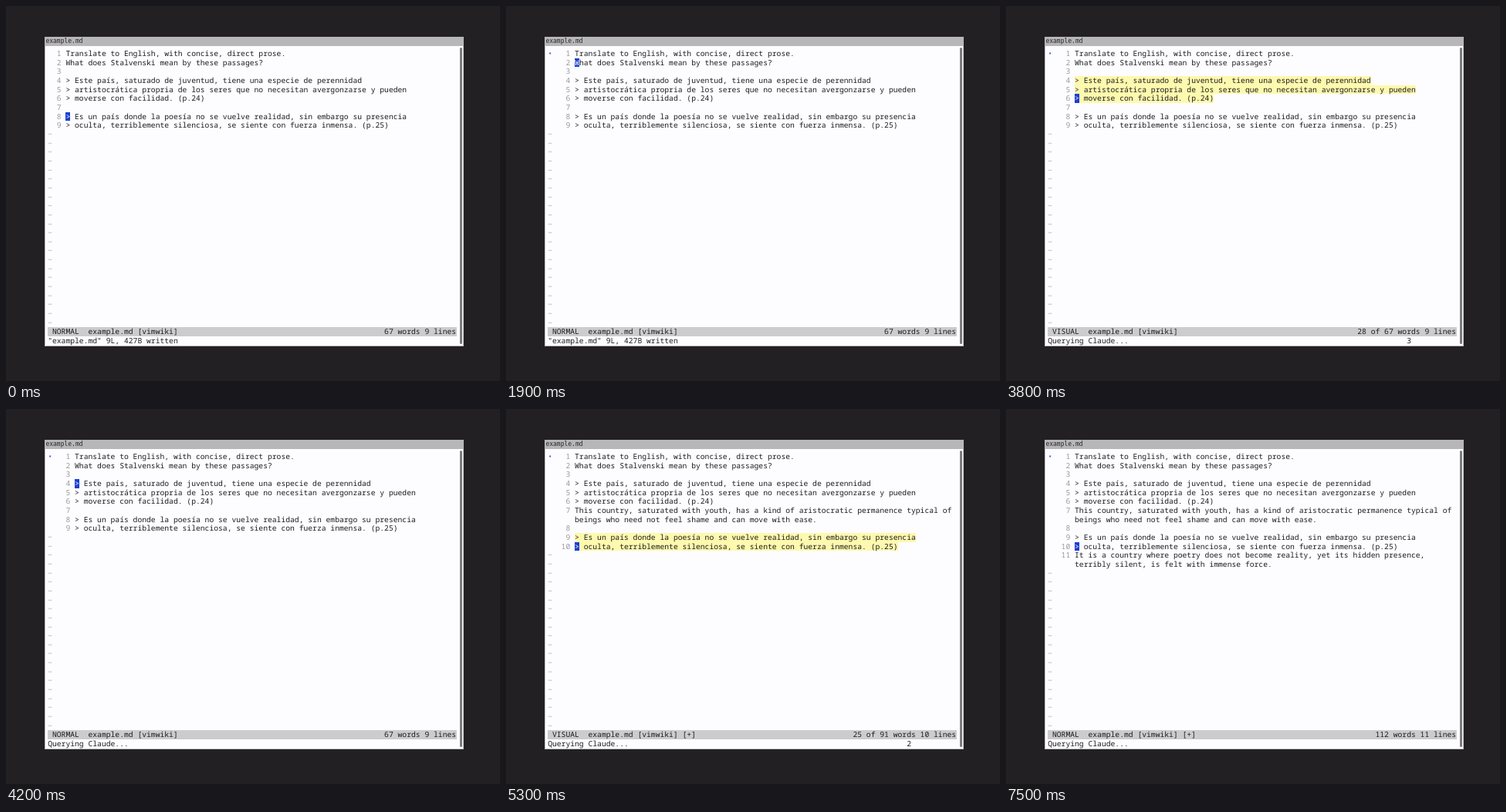
Recreate the animation shown at these times as an HTML page. Size 640x487 px, loop 8000 ms.

```html
<!DOCTYPE html>
<html lang="en">
<head>
<meta charset="utf-8">
<title>example.md</title>
<style>
  html, body { margin: 0; width: 100%; height: 100%; overflow: hidden; background: #222023; }
  #stage { position: relative; width: 640px; height: 487px; overflow: hidden; }
  #stage div { position: absolute; }
  #window { left: 50px; top: 40px; width: 543px; height: 401.5px; background: #fdfcfe; box-shadow: inset 0 0 0 1px #b9b8ba; }
  #title { left: 0; top: 0; width: 543px; height: 12px; background: #b7b6b8;
    font: 8px/12px "DejaVu Sans Mono", monospace; color: #29282a; text-indent: 1.4px; }
  #scroll { left: 538px; top: 13.5px; width: 3.3px; height: 385px; border-radius: 1.5px; background: #7b7a7c; }
  #screen { left: 54.2px; top: 56.2px; width: 530px; height: 385px; text-rendering: geometricPrecision;
    font: 9.7px/11.65px "Noto Sans Mono", "DejaVu Sans Mono", monospace; color: #1d1c1f; }
  .row { left: 0; height: 11.65px; white-space: pre; }
  .row span { display: inline-block; height: 11.65px; line-height: 11.65px; vertical-align: top; white-space: pre; }
  .status { width: 529.7px; background: #cccbcd; }
  .num { color: #9b9a9c; }
  .tilde { color: #a9a8aa; }
  .sign { color: #4a62dc; }
  .sel { background: #fdf9ae; }
  .row .cur { background: #1b3fd2; color: #fff; }
</style>
</head>
<body>
<div id="stage">
  <div id="window">
    <div id="title">example.md</div>
    <div id="scroll"></div>
  </div>
  <div id="screen"></div>
</div>
<script>
const LOOP = 8000, ROW = 11.65, COLS = 91, TEXT_ROWS = 31, SHOWCMD_COL = 80;

const note = [
  "Translate to English, with concise, direct prose.",
  "What does Stalvenski mean by these passages?",
  "",
  "> Este país, saturado de juventud, tiene una especie de perennidad",
  "> artistocrática propria de los seres que no necesitan avergonzarse y pueden",
  "> moverse con facilidad. (p.24)",
  "",
  "> Es un país donde la poesía no se vuelve realidad, sin embargo su presencia",
  "> oculta, terriblemente silenciosa, se siente con fuerza inmensa. (p.25)"
];
// A newline inside a line marks its soft wrap.
const replies = [
  "This country, saturated with youth, has a kind of aristocratic permanence typical of\nbeings who need not feel shame and can move with ease.",
  "It is a country where poetry does not become reality, yet its hidden presence,\nterribly silent, is felt with immense force."
];
const docs = [note];
docs.push([...note.slice(0, 6), replies[0], ...note.slice(6)]);
docs.push([...docs[1], replies[1]]);

// Each step overrides part of the editor state; anchor 0 means normal mode.
const steps = [
  [0, { cur: 8, anchor: 0, sign: false, doc: 0, msg: '"example.md" 9L, 427B written' }],
  [200, { cur: 1 }],
  [400, { anchor: 1 }],
  [600, { cur: 2 }],
  [900, { cur: 1, anchor: 0 }],
  [1000, { sign: true }],
  [1900, { cur: 2 }],
  [2100, { cur: 3 }],
  [2300, { cur: 4 }],
  [2500, { anchor: 4 }],
  [2700, { cur: 5 }],
  [2900, { cur: 6 }],
  [3500, { msg: "Querying Claude..." }],
  [3900, { cur: 4, anchor: 0 }],
  [4300, { cur: 6, doc: 1 }],
  [4600, { cur: 7 }],
  [4700, { cur: 8 }],
  [4800, { cur: 9 }],
  [5000, { anchor: 9 }],
  [5200, { cur: 10 }],
  [5500, { cur: 9, anchor: 0 }],
  [6900, { cur: 10, doc: 2 }]
];

const screen = document.getElementById("screen");
const esc = s => s.replace(/&/g, "&amp;").replace(/</g, "&lt;").replace(/>/g, "&gt;");
const span = (cls, s) => s ? `<span class="${cls}">${esc(s)}</span>` : "";
const words = lines => lines.join(" ").split(/\s+/).filter(Boolean).length;

function stateAt(t) {
  return Object.assign({}, ...steps.filter(s => s[0] <= t).map(s => s[1]));
}

function textRows({ cur, anchor, sign, doc }) {
  const rows = [];
  docs[doc].forEach((line, i) => {
    const n = i + 1;
    const selected = anchor && n >= anchor && n <= cur;
    line.split("\n").forEach((part, k) => {
      const gutter = (sign ? span("sign", n === 1 && !k ? "• " : "  ") : "") +
        span("num", (k ? "" : String(n)).padStart(3) + " ");
      const cls = selected ? "sel" : "txt";
      const body = n === cur && !k
        ? span("cur", part[0] || " ") + span(cls, part.slice(1))
        : span(cls, part);
      rows.push(gutter + body);
    });
  });
  while (rows.length < TEXT_ROWS) rows.push(span("tilde", "~"));
  return rows;
}

function statusRow({ cur, anchor, doc }) {
  const lines = docs[doc];
  const left = ` ${anchor ? "VISUAL" : "NORMAL"}  example.md [vimwiki]${doc ? " [+]" : ""}`;
  const picked = anchor ? words(lines.slice(anchor - 1, cur)) + " of " : "";
  const right = `${picked}${words(lines)} words ${lines.length} lines`;
  return left + right.padStart(COLS - left.length);
}

function render(state) {
  const { cur, anchor, msg } = state;
  const command = msg.padEnd(SHOWCMD_COL) + (anchor ? cur - anchor + 1 : "");
  const rows = [...textRows(state), esc(statusRow(state)), esc(command)];
  screen.innerHTML = rows.map((html, i) =>
    `<div class="row${i === TEXT_ROWS ? " status" : ""}" style="top:${(i * ROW).toFixed(2)}px">${html}</div>`
  ).join("");
}

let shown = "";
const start = performance.now();
function tick() {
  const state = stateAt((performance.now() - start) % LOOP);
  const key = JSON.stringify(state);
  if (key !== shown) {
    shown = key;
    render(state);
  }
  requestAnimationFrame(tick);
}
tick();
</script>
</body>
</html>
```
